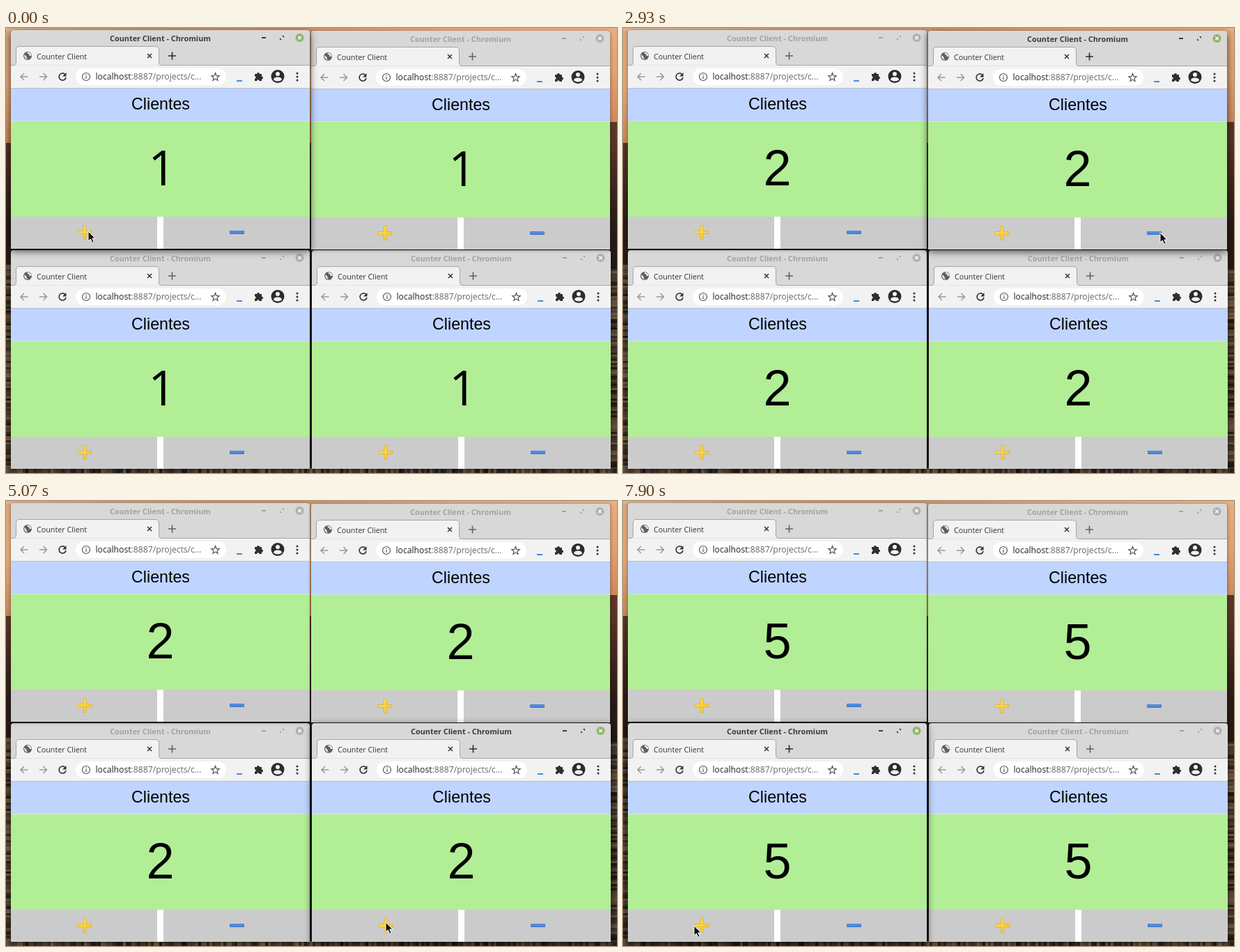
An HTML page with a canvas that plays this animation: 877x639 px, repeating every 8 s.

```html
<!DOCTYPE html>
<html lang="es">
<head>
<meta charset="utf-8">
<title>Counter Client</title>
<style>
html, body { margin: 0; width: 100%; height: 100%; overflow: hidden; background: #2a1d15; }
canvas { display: block; }
</style>
</head>
<body>
<canvas id="stage" width="877" height="639"></canvas>
<script>
const ctx = document.getElementById('stage').getContext('2d');
const LOOP = 8000;
const RAISE_LEAD = 200; // a window is raised this long before its click counts
const UI = '"Open Sans", "Noto Sans", sans-serif';
const PAGE = '"Liberation Sans", Arial, sans-serif';

// Offsets of the four windows from the top left one
const windows = [[0, 0], [431, 1], [0, 316], [432, 316]];

const clicks = [
  { at: 270, win: 0, step: 1 }, { at: 970, win: 0, step: 1 },
  { at: 2870, win: 1, step: -1 }, { at: 3670, win: 1, step: -1 },
  { at: 5000, win: 3, step: 1 }, { at: 5700, win: 3, step: 1 }, { at: 6430, win: 3, step: 1 },
  { at: 7770, win: 2, step: 1 }
];

// Where the pointer goes; "sag" bends the path downwards
const trips = [
  { from: 1610, to: 2040, x: 771, y: 294, sag: 3 },
  { from: 3930, to: 4670, x: 545, y: 605, sag: 0 },
  { from: 5330, to: 6200, x: 543, y: 600, sag: 0 },
  { from: 6620, to: 7570, x: 102, y: 610, sag: 16 }
];

function pointerAt(t) {
  t = Math.floor(t * .03 + .1) / .03;
  let x = 118, y = 292;
  for (const trip of trips) {
    if (t < trip.from) break;
    const p = Math.min(1, (t - trip.from) / (trip.to - trip.from));
    const e = Math.sin(p * Math.PI / 2);
    x += (trip.x - x) * e;
    y += (trip.y - y) * e + trip.sag * Math.sin(Math.PI * e);
  }
  return [Math.round(x), Math.round(y)];
}

function random(n) {
  const v = Math.sin(n * 12.9898) * 43758.5453;
  return v - Math.floor(v);
}

function rect(x, y, w, h, fill) {
  ctx.fillStyle = fill;
  ctx.fillRect(x, y, w, h);
}
function roundRect(x, y, w, h, r, fill) {
  ctx.fillStyle = fill;
  ctx.beginPath();
  ctx.roundRect(x, y, w, h, r);
  ctx.fill();
}
function disc(x, y, r, fill) {
  ctx.fillStyle = fill;
  ctx.beginPath();
  ctx.arc(x, y, r, 0, 7);
  ctx.fill();
}
function shape(d, fill, stroke, width = 1) {
  const p = new Path2D(d);
  if (fill) { ctx.fillStyle = fill; ctx.fill(p); }
  if (stroke) { ctx.strokeStyle = stroke; ctx.lineWidth = width; ctx.stroke(p); }
}
function label(s, x, y, font, fill, align = 'left') {
  ctx.font = font;
  ctx.fillStyle = fill;
  ctx.textAlign = align;
  ctx.fillText(s, x, y);
  return ctx.measureText(s).width;
}
function blend(x0, y0, x1, y1, ...colors) {
  const g = ctx.createLinearGradient(x0, y0, x1, y1);
  colors.forEach((c, i) => g.addColorStop(i / (colors.length - 1), c));
  return g;
}

// Evening sky over dark hills, with grass along the lower edges
function wallpaper() {
  rect(0, 0, 877, 639, blend(0, 160, 0, 400, '#5a3527', '#2b1a16', '#1f1511'));
  rect(0, 0, 439, 165, blend(0, 0, 0, 165, '#dba77c', '#e3a878', '#c58558'));
  rect(439, 0, 438, 135, blend(0, 0, 0, 135, '#e9ad7d', '#e0a273', '#cf8a5b'));
  rect(0, 0, 877, 4, blend(0, 0, 877, 0, '#e0b48f', '#cf9a6e', '#d09468', '#e6aa7c', '#ebb081'));
  const grass = n => `hsl(30 25% ${8 + 26 * random(n)}%)`;
  for (let y = 340; y < 639; y += 3) {
    rect(0, y, 8, 3, grass(y));
    rect(867, y, 10, 3, grass(y + 1000));
  }
  for (let x = 0; x < 877; x += 4) rect(x, 632, 4, 7, grass(x + 2000));
}

function titleBar(active) {
  const ink = active ? '#3a3a3a' : '#a2a2a2';
  label('Counter Client - Chromium', 221.5, 18.5, `700 10.85px ${UI}`, ink, 'center');
  rect(367, 13, 6, 2, ink);
  shape('M396 11h3v3zM393 14v3h3z', ink);
  disc(421.5, 14, 6, active ? '#8fb768' : '#b0b0b0');
  shape('M419.3 11.8l4.4 4.4m0-4.4l-4.4 4.4', null, '#fff', 1.4);
}

function tabStrip(active) {
  shape('M7 53.5H10Q14.5 53.5 14.5 49V31Q14.5 26.5 19 26.5H214Q219.5 26.5 219.5 31V49Q219.5 53.5 224 53.5H436',
    '#f2f2f2', '#a5a5a5');
  disc(31, 40, 6, '#5c6063');
  shape('M26 38l3.5 3v2l2 2h-.5q-5-1-5-7zM30 35l1.5 2 2 1v2h3q-.5-4-4-5z', '#f2f2f2');
  label('Counter Client', 44, 44.5, `10.75px ${UI}`, '#333');
  shape('M203 37l6 6m0-6l-6 6', null, '#333', 1.5);
  shape('M233 40h11M238.5 34.5v11', null, active ? '#2b2b2b' : '#626262', 1.6);
}

function star(cx, cy, outer, inner) {
  const points = Array.from({ length: 10 }, (_, i) => {
    const r = i % 2 ? inner : outer, a = i * Math.PI / 5;
    return `${cx + r * Math.sin(a)} ${cy - r * Math.cos(a)}`;
  });
  shape(`M${points.join('L')}z`, null, '#555', 1.2);
}

function toolbar() {
  rect(7, 54, 429, 33, '#f2f2f2');
  shape('M31.5 70H21m5-5l-5 5 5 5M48 70h10.5m-5-5l5 5-5 5', null, '#999', 1.5);
  shape('M84.7 66.5A5 5 0 1 0 86 71', null, '#333', 1.7);
  shape('M86.5 64v5.5H81z', '#333');
  roundRect(100, 58, 216, 24, 12, '#fff');
  shape('M120.5 70a5.5 5.5 0 1 0-11 0a5.5 5.5 0 1 0 11 0M115 66.5v1.4m0 1.2v4', null, '#555', 1.2);
  const font = `12.2px ${UI}`;
  const w = label('localhost', 128.5, 74, font, '#222');
  label(':8887/projects/c...', 128.5 + w, 74, font, '#666');
  star(300.5, 70.5, 6, 2.6);
  rect(331, 75, 8, 2, '#4287e6');
  shape('M357 66h3a2 2 0 1 1 4 0h3v3.5a2 2 0 1 1 0 4V76h-3.5a1.7 1.7 0 1 0-3.4 0H357v-3.3a1.7 1.7 0 1 0 0-3.4z', '#2f2f2f');
  disc(390, 69.5, 9.5, '#2b2c2f');
  disc(390, 66, 3, '#f2f2f2');
  shape('M384 74.5q0-4 6-4t6 4q-6 4-12 0z', '#f2f2f2');
  for (let y = 65; y <= 75; y += 5) disc(418, y, 1.5, '#333');
}

function page(count) {
  rect(7, 86, 429, 1, '#b9c0cc');
  rect(7, 87, 429, 46, '#bfd4ff');
  rect(7, 133, 429, 1, '#d0e6d8');
  rect(7, 134, 429, 137, '#b2ee96');
  label('Clientes', 222, 117, `23.2px ${PAGE}`, '#000', 'center');
  // The page's "1" has no foot, unlike the other face
  if (count === 1) label(count, 224, 226, `70px ${UI}`, '#000', 'center');
  else label(count, 221.5, 226, `72px ${PAGE}`, '#000', 'center');
  rect(7, 271, 429, 46, '#cbcbcb');
  rect(217, 271, 9, 46, '#fff');
  shape('M111 283.5h4v8h8v4h-8v8h-4v-8h-8v-4h8z', blend(103, 283, 123, 303, '#ffe45c', '#f2c32c'), '#dfb32f', .8);
  shape('M321.5 291.5h20v4h-20z', blend(0, 291, 0, 296, '#6ba3f2', '#2f6fd6'), '#3a70c4', .8);
}

function drawWindow([dx, dy], active, count) {
  ctx.save();
  ctx.translate(dx, dy);
  ctx.save();
  ctx.shadowColor = `rgba(0,0,0,${active ? .7 : .45})`;
  ctx.shadowBlur = active ? 11 : 5;
  ctx.shadowOffsetY = active ? 3 : 1;
  roundRect(7, 3, 429, 314, [4, 4, 0, 0], '#d8d8d8');
  ctx.restore();
  titleBar(active);
  tabStrip(active);
  toolbar();
  page(count);
  ctx.restore();
}

function drawPointer([x, y]) {
  ctx.save();
  ctx.translate(x - .5, y - .5);
  ctx.lineJoin = 'round';
  shape('M.5.5V14.5L3.8 11.5 6.3 17 8.7 16 6.3 10.5H10.5z', '#111', '#fff');
  ctx.restore();
}

function draw(t) {
  let count = 1;
  const order = [2, 3, 1, 0]; // back to front
  for (const { at, win, step } of clicks) {
    if (t >= at) count += step;
    if (t >= at - RAISE_LEAD) order.push(...order.splice(order.indexOf(win), 1));
  }
  wallpaper();
  order.forEach((id, i) => drawWindow(windows[id], i === 3, count));
  drawPointer(pointerAt(t));
}

const begin = performance.now();
function tick() {
  draw((performance.now() - begin) % LOOP);
  requestAnimationFrame(tick);
}
tick();
</script>
</body>
</html>
```
